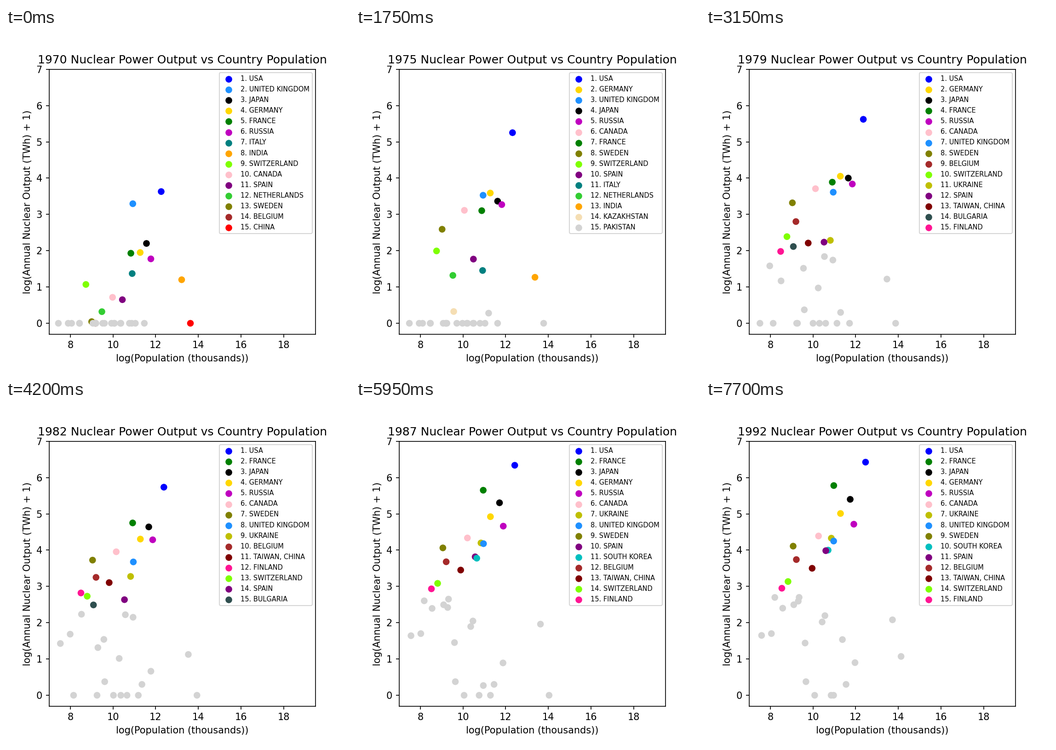
Write a matplotlib script that moves like this. It is 748x748 px and loops after 8 s.

```python
from math import exp

import numpy as np
import matplotlib.pyplot as plt
from matplotlib.animation import FuncAnimation

SIZE, DPI = 748, 150
LOOP, STEP, HOLD = 8000, 50, 350   # ms
FIRST, LAST, TOP = 70, 92, 15
EASE = 1.5, 1, 3                   # ease-out power between key years
GRAY = "lightgray"
countries = []


def drift(p0, p1):
    """Log population, growing a little faster at the beginning."""
    return lambda year: p0 + (p1 - p0) * ((year - FIRST) / (LAST - FIRST)) ** 0.8


def keyed(name, color, p0, p1, *vals):
    """Output eased through its values in 1970, 1977, 1982 and 1992."""
    keys = (FIRST if vals[0] else 75), 77, 82, LAST

    def output(year):
        if year <= keys[0]:
            return vals[0]
        j = np.searchsorted(keys, year) - 1
        u = (year - keys[j]) / (keys[j + 1] - keys[j])
        return vals[j] + (vals[j + 1] - vals[j]) * (1 - (1 - u) ** EASE[j])

    countries.append((name, color, drift(p0, p1), output))


def saturating(p0, start, level, name="", color=GRAY):
    """Output that switches on in its start year and settles at a level."""
    def output(year):
        return level * (1 - exp(-(year - start + 1) / 1.5)) if year >= start else 0

    countries.append((name, color, drift(p0, p0 + (0.15 if p0 < 10 else 0.5)), output))


keyed("USA", "b", 12.26, 12.465, 3.63, 5.545, 5.735, 6.425)
keyed("UNITED KINGDOM", "dodgerblue", 10.93, 10.97, 3.295, 3.57, 3.675, 4.25)
keyed("JAPAN", "k", 11.57, 11.745, 2.2, 3.575, 4.64, 5.4)
keyed("GERMANY", "gold", 11.275, 11.29, 1.95, 3.885, 4.305, 5.01)
keyed("FRANCE", "g", 10.838, 10.975, 1.93, 3.315, 4.75, 5.78)
keyed("RUSSIA", "m", 11.776, 11.915, 1.775, 3.54, 4.285, 4.715)
keyed("ITALY", "teal", 10.9, 10.967, 1.37, 1.47, 2.15, 0)
keyed("INDIA", "orange", 13.22, 13.727, 1.2, 1.28, 1.125, 2.08)
keyed("SWITZERLAND", "chartreuse", 8.73, 8.83, 1.07, 2.16, 2.73, 3.135)
keyed("CANADA", "pink", 9.98, 10.26, 0.715, 3.545, 3.955, 4.39)
keyed("SPAIN", "purple", 10.44, 10.6, 0.65, 1.97, 2.635, 3.985)
keyed("NETHERLANDS", "limegreen", 9.48, 9.63, 0.32, 1.5, 1.54, 1.44)
keyed("SWEDEN", "olive", 9.0, 9.07, 0.045, 3.05, 3.725, 4.11)
keyed("BELGIUM", "brown", 9.18, 9.22, 0, 2.505, 3.25, 3.74)
saturating(13.63, 92, 2.2, "CHINA", "r")
keyed("BULGARIA", "darkslategray", 9.06, 9.1, 0, 1.865, 2.49, 2.495)
keyed("UKRAINE", "y", 10.77, 10.86, 0, 1.625, 3.275, 4.33)
keyed("TAIWAN, CHINA", "maroon", 9.6, 9.96, 0, 1.615, 3.105, 3.5)
keyed("SOUTH KOREA", "c", 10.37, 10.71, 0, 1.585, 2.22, 4.0)
keyed("FINLAND", "deeppink", 8.43, 8.54, 0, 1.42, 2.82, 2.95)
keyed("ARGENTINA", "skyblue", 10.07, 10.43, 0, 0.945, 1.015, 2.02)
saturating(11.05, 72, 0.3, "PAKISTAN")
saturating(9.52, 73, 0.375, "KAZAKHSTAN", "wheat")

# smaller producers that never reach the ranking
saturating(7.44, 80, 1.65)
saturating(7.9, 76, 1.7)
saturating(8.06, 83, 2.7)
saturating(8.43, 79, 2.4)
saturating(9.16, 84, 2.6)
saturating(9.2, 82, 2.7)
saturating(9.93, FIRST, 0)
saturating(10.06, 84, 2.2)
saturating(10.35, FIRST, 0)
saturating(10.88, 89, 1.65)
saturating(11.47, 81, 0.9)


def ranking(year):
    """(output, log population, name, color) rows, largest output first."""
    rows = [(output(year), pop(year), name, color)
            for name, color, pop, output in countries]
    return sorted(rows, key=lambda r: -r[0])


fig, ax = plt.subplots(figsize=(SIZE / DPI, SIZE / DPI), dpi=DPI)
ax.set(xlim=(7, 19.5), ylim=(-0.3, 7), xticks=range(8, 19, 2), yticks=range(8),
       xlabel="log(Population (thousands))",
       ylabel="log(Annual Nuclear Output (TWh) + 1)")
title = ax.set_title("")
n = len(countries)
dots = ax.scatter(np.zeros(n), np.zeros(n), color=[GRAY] * n)
keys = [ax.scatter([], [], color=GRAY, label="-") for _ in range(TOP)]
legend = ax.legend(handles=keys, loc="upper right", fontsize=7, labelspacing=0.555)


def update(i):
    year = FIRST + i * STEP // HOLD
    rows = ranking(year)
    title.set_text(f"19{year} Nuclear Power Output vs Country Population")
    dots.set_offsets([(pop, out) for out, pop, _, _ in rows])
    dots.set_color([r[3] if k < TOP else GRAY for k, r in enumerate(rows)])
    entries = zip(legend.legend_handles, legend.get_texts(), rows)
    for k, (mark, text, row) in enumerate(entries, 1):
        mark.set_color(row[3])
        text.set_text(f"{k}. {row[2]}")
    return dots, title, legend


anim = FuncAnimation(fig, update, frames=LOOP // STEP, interval=STEP,
                     repeat=True, repeat_delay=0)
plt.show()
```
